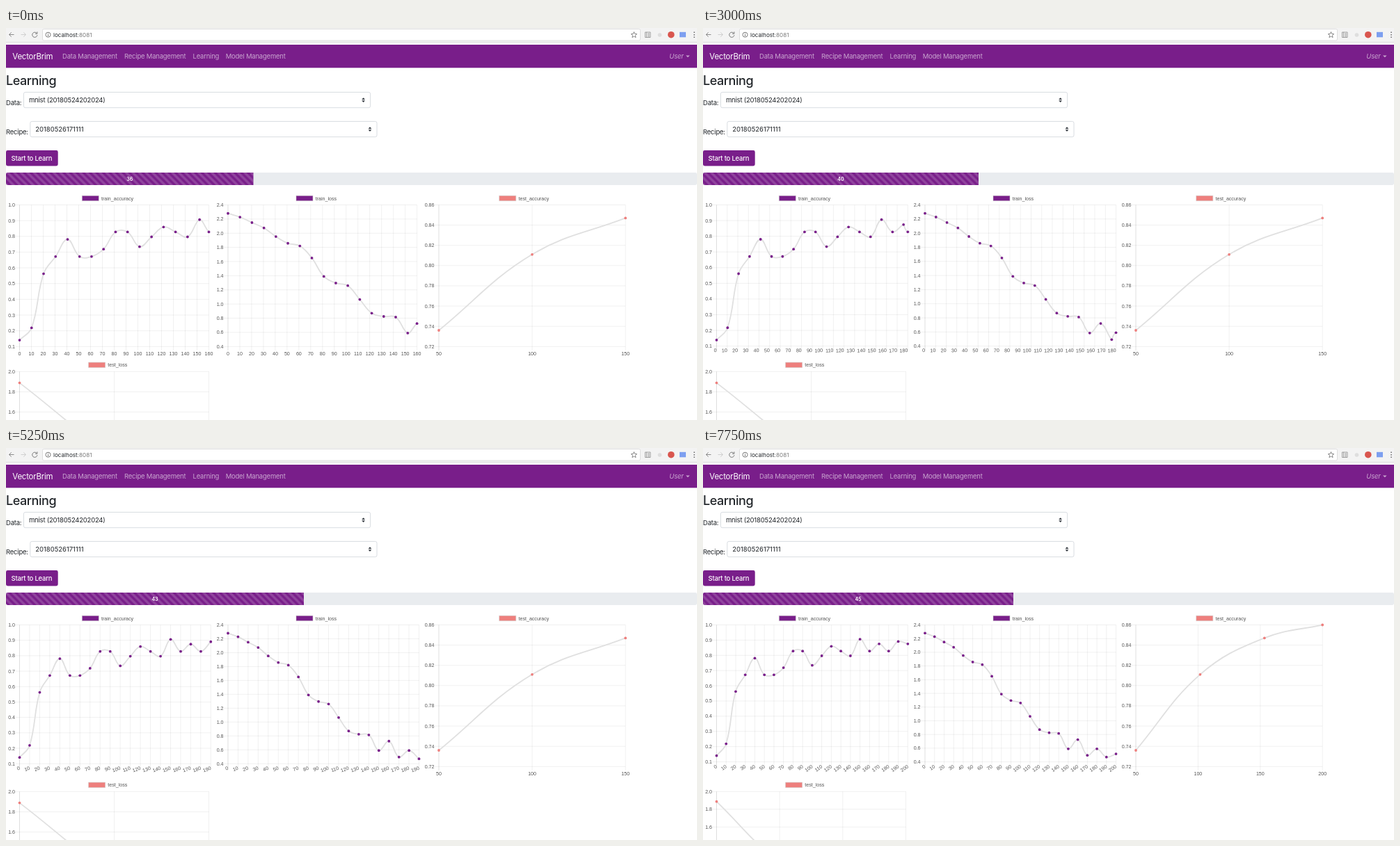
Animation of 993x564 px, one loop 8000 ms. Source, as an HTML page:

```html
<!DOCTYPE html>
<html lang="en">
<head>
<meta charset="utf-8">
<title>Learning</title>
<style>
  html, body { margin: 0; width: 100%; height: 100%; overflow: hidden; background: #fff; }
  svg { display: block; width: 993px; height: 564px; }
  .ui { font: 9.46px Inter, sans-serif; letter-spacing: -.02em; fill: #212529; }
  .chart { font: 7.1px "Liberation Sans", Arial, sans-serif; fill: #555; }
  .nav { fill: #fff; fill-opacity: .6; }
  .field { fill: #fff; stroke: #ced4da; stroke-width: .8; }
  .icon { fill: none; stroke: #6a6a6a; stroke-width: 1; }
</style>
</head>
<body>
<svg viewBox="0 0 993 564">
  <defs>
    <pattern id="stripes" y="208" width="9.46" height="9.46" patternUnits="userSpaceOnUse">
      <path d="M0 9.46V4.73L4.73 9.46ZM0 0H4.73L9.46 4.73V9.46Z" fill="#fff" fill-opacity=".17"/>
    </pattern>
    <clipPath id="track"><rect y="208" width="993" height="18" rx="2.4"/></clipPath>
    <path id="arrows" d="M-2.4-.6L0-3.2L2.4-.6ZM-2.4 .8L0 3.4L2.4 .8Z" fill="#343a40"/>
  </defs>

  <!-- browser bar -->
  <rect width="993" height="20" fill="#f3f3f3"/>
  <path d="M0 20.5H993" stroke="#d4d4d4" stroke-width=".8"/>
  <rect x="52.5" y="1.5" width="859" height="16.5" rx="2" fill="#fff" stroke="#d6d6d6" stroke-width=".8"/>
  <path class="icon" d="M11.5 9.5H4.5M7.7 6.3L4.5 9.5L7.7 12.7" style="stroke:#8a8a8a"/>
  <path class="icon" d="M21.5 9.5H28.5M25.3 6.3L28.5 9.5L25.3 12.7" style="stroke:#cfcfcf"/>
  <path class="icon" d="M44.2 7.6A3.6 3.6 0 1 0 44.9 10.2M44.9 5.4V8.2H42" style="stroke:#7a7a7a"/>
  <circle class="icon" cx="60.5" cy="9.7" r="3.5" style="stroke-width:.9"/>
  <path class="icon" d="M60.5 9.2V11.8M60.5 7.4V8.3"/>
  <text class="ui" x="68" y="12.8" style="font-size:8.15px;letter-spacing:0">localhost<tspan fill="#777">:8081</tspan></text>
  <path class="icon" d="M902.5 5.6L903.7 8.4L906.7 8.7L904.4 10.7L905.1 13.6L902.5 12L899.9 13.6L900.6 10.7L898.3 8.7L901.3 8.4Z" style="stroke-width:.8"/>
  <path class="icon" d="M918.5 6H926V13.5H918.5ZM920.5 6V13.5M922 8H925M922 10H925M922 12H925" style="stroke:#8c8c8c;stroke-width:.8"/>
  <circle cx="939.5" cy="10" r="2.8" fill="#dedede"/>
  <circle cx="955.8" cy="9.7" r="4.8" fill="#d9564f"/>
  <rect x="968" y="5.8" width="9" height="7.5" fill="#7d9ff0"/>
  <path d="M988.3 5.5h1.5v1.5h-1.5zM988.3 9h1.5v1.5h-1.5zM988.3 12.5h1.5v1.5h-1.5z" fill="#666"/>

  <!-- navigation -->
  <rect y="24" width="993" height="33.3" fill="#791e8a"/>
  <g class="ui">
    <text x="9.3" y="45" style="font-size:11.4px;fill:#fff">VectorBrim</text>
    <g class="nav">
      <text x="81" y="44.4">Data Management</text>
      <text x="170" y="44.4">Recipe Management</text>
      <text x="268.5" y="44.4">Learning</text>
      <text x="315.7" y="44.4">Model Management</text>
      <text x="953.3" y="44.4" font-style="italic">User</text>
      <path d="M977 39.4H982.6L979.8 42.2Z"/>
    </g>

    <!-- form -->
    <text x="0" y="82" style="font-size:18px;font-weight:500;letter-spacing:-.025em">Learning</text>
    <text x="0" y="110.6">Data:</text>
    <rect class="field" x="25.4" y="92.4" width="498.2" height="22.3" rx="2.4"/>
    <text x="33" y="107.1">mnist (20180524202024)</text>
    <use href="#arrows" x="513.6" y="103.5"/>
    <text x="0" y="152.6">Recipe:</text>
    <rect class="field" x="34.8" y="134.4" width="498.2" height="22.3" rx="2.4"/>
    <text x="42.3" y="149" style="letter-spacing:0">20180526171111</text>
    <use href="#arrows" x="523" y="145.5"/>
    <rect y="176" width="74.7" height="22.4" rx="2.4" fill="#791e8a"/>
    <text x="7.5" y="190.8" style="fill:#fff;font-weight:500">Start to Learn</text>
  </g>

  <!-- progress -->
  <g clip-path="url(#track)">
    <rect y="208" width="993" height="18" fill="#e9ecef"/>
    <rect class="bar" y="208" height="18" fill="#791e8a"/>
    <rect class="bar" y="208" height="18" fill="url(#stripes)"/>
  </g>
  <text id="percent" class="ui" y="219.6" text-anchor="middle" style="font-size:7.1px;font-weight:600;fill:#fff;letter-spacing:0"></text>

  <g id="charts" class="chart"></g>
</svg>

<script>
const LOOP = 8000, STEP = 250, REM = 9.46, TICK = 5.9;
const PURPLE = '#791e8a', SALMON = '#ee7f7d';

// bar width in px over time
const barKeys = [[0, 355.5], [1750, 378], [3000, 396], [4500, 418], [6000, 438], [7000, 443], [8000, 447]];
// moments at which a new sample arrives
const trainTimes = [-320, 1260, 2925, 4560, 6160];
const testTimes = [-5000, 7260];
// label tilt, by number of intervals on the axis
const tilts = { 18: 3, 19: 20, 20: 34 };
const radians = n => (tilts[n] || 0) * Math.PI / 180;

const trainBottom = n => 458.3 - 12 * Math.sin(radians(n));
const charts = [
  { name: 'train_accuracy', legend: 109.3, left: 19.5, top: 254.5, color: PURPLE,
    right: n => n > 17 ? 294.3 : 291.5, bottom: trainBottom,
    min: () => .1, max: 1, step: .1, digits: 1, start: 0, gap: 10, first: 15, times: trainTimes,
    values: [9, 14, 36, 43, 50, 43, 43, 46, 53, 53, 47, 51, 55, 53, 51, 58, 53, 56, 53, 57, 56].map(v => v / 64) },
  { name: 'train_loss', legend: 417, left: 319, top: 254.5, color: PURPLE,
    right: n => n > 17 ? 593.5 : 590.6, bottom: trainBottom,
    min: () => .4, max: 2.4, step: .2, digits: 1, start: 0, gap: 10, first: 15, times: trainTimes,
    values: [2.28, 2.228, 2.15, 2.074, 1.953, 1.858, 1.82, 1.65, 1.39, 1.296, 1.26,
      1.065, .871, .825, .815, .59, .725, .496, .59, .47, .517] },
  { name: 'test_accuracy', legend: 708.8, left: 622, top: 254.5, color: SALMON,
    right: () => 890.2, bottom: () => 458.3,
    min: () => .72, max: .86, step: .02, digits: 2, start: 50, gap: 50, first: 1, times: testTimes,
    values: [.736, .811, .847, .86] },
  { name: 'test_loss', legend: 118.6, left: 19.5, top: 494.3, color: SALMON,
    right: () => 291.5, bottom: () => 698.1,
    min: n => n > 2 ? .4 : .6, max: 2, step: .2, digits: 1, start: 50, gap: 50, first: 1, times: testTimes,
    values: [1.888, 1.18, .75, .55] },
];

const mix = (a, b, k) => a + (b - a) * k;
const text = (x, y, s, anchor, extra = '') => `<text x="${x}" y="${y}" text-anchor="${anchor}" ${extra}>${s}</text>`;
const line = (x1, y1, x2, y2, alpha = .1) =>
  `<path d="M${x1} ${y1}L${x2} ${y2}" stroke="#000" stroke-opacity="${alpha}" stroke-width=".6"/>`;

// Points with their spline handles: [x, y, inX, inY, outX, outY]
function layout(c, n) {
  const right = c.right(n), bottom = c.bottom(n), min = c.min(n);
  const clamp = y => Math.min(bottom, Math.max(c.top, y));
  const pts = c.values.slice(0, n + 1).map((v, i) =>
    [mix(c.left, right, i / n), mix(bottom, c.top, (v - min) / (c.max - min))]);
  return pts.map((p, i) => {
    const a = pts[i - 1] || p, b = pts[i + 1] || p;
    const before = Math.hypot(p[0] - a[0], p[1] - a[1]), after = Math.hypot(b[0] - p[0], b[1] - p[1]);
    const ka = .4 * before / (before + after), kb = .4 * after / (before + after);
    const dx = b[0] - a[0], dy = b[1] - a[1];
    return [...p, p[0] - ka * dx, clamp(p[1] - ka * dy), p[0] + kb * dx, clamp(p[1] + kb * dy)];
  });
}

function drawAxes(c, n) {
  const right = c.right(n), bottom = c.bottom(n), min = c.min(n), tilt = tilts[n];
  const rows = Math.round((c.max - min) / c.step);
  let out = '';
  for (let i = 0; i <= rows; i++) {
    const y = mix(c.top, bottom, i / rows);
    out += line(c.left - TICK, y, right, y)
      + text(c.left - TICK - .6, y + 2.5, (c.max - i * c.step).toFixed(c.digits), 'end');
  }
  for (let i = 0; i <= n; i++) {
    const x = mix(c.left, right, i / n), label = c.start + i * c.gap, y = bottom + TICK;
    out += line(x, c.top, x, y, i ? .1 : .22);
    out += tilt
      ? text(x, y + 2.5, label, 'end', `transform="rotate(${-tilt} ${x} ${y})"`)
      : text(x, bottom + 12.5, label, 'middle');
  }
  return out;
}

function drawChart(c, time) {
  const latest = c.times.filter(t => t <= time).length - 1;
  const n = c.first + 1 + latest;
  const progress = Math.min(1, (time - c.times[latest]) / 1000);
  const ease = 1 - (1 - progress) ** 4;
  const old = layout(c, n - 1);
  const pts = layout(c, n).map((p, i) => old[i] ? p.map((v, j) => mix(old[i][j], v, ease)) : p);

  let d = `M${pts[0][0]} ${pts[0][1]}`;
  for (let i = 1; i < pts.length; i++)
    d += `C${pts[i - 1].slice(4)} ${pts[i].slice(2, 4)} ${pts[i].slice(0, 2)}`;
  const dots = pts.map(p => `<circle cx="${p[0]}" cy="${p[1]}" r="1.9" fill="${c.color}"/>`).join('');
  return `<rect x="${c.legend}" y="${c.top - 13.2}" width="24" height="7.4" fill="${c.color}" stroke="#ccc" stroke-opacity=".6" stroke-width=".9"/>`
    + text(c.legend + 27.7, c.top - 7, c.name, 'start')
    + drawAxes(c, n)
    + `<path d="${d}" fill="none" stroke="#e0e0e0" stroke-width="1.8"/>` + dots;
}

function barWidth(time) {
  const i = barKeys.findIndex(k => k[0] > time);
  const [t0, w0] = barKeys[i - 1], [t1, w1] = barKeys[i];
  return mix(w0, w1, (time - t0) / (t1 - t0));
}

const $ = id => document.getElementById(id);
const bars = document.querySelectorAll('.bar');

function render(time) {
  const width = barWidth(time);
  bars.forEach(b => b.setAttribute('width', width));
  $('percent').setAttribute('x', width / 2);
  $('percent').textContent = Math.floor(width / 9.93 + .35);
  $('stripes').setAttribute('x', REM * (1 - time % 1000 / 1000));
  $('charts').innerHTML = charts.map(c => drawChart(c, time)).join('');
}

let shown = -1;
function tick() {
  const time = Math.floor(performance.now() % LOOP / STEP) * STEP;
  if (time !== shown) render(shown = time);
  requestAnimationFrame(tick);
}
tick();
</script>
</body>
</html>
```
